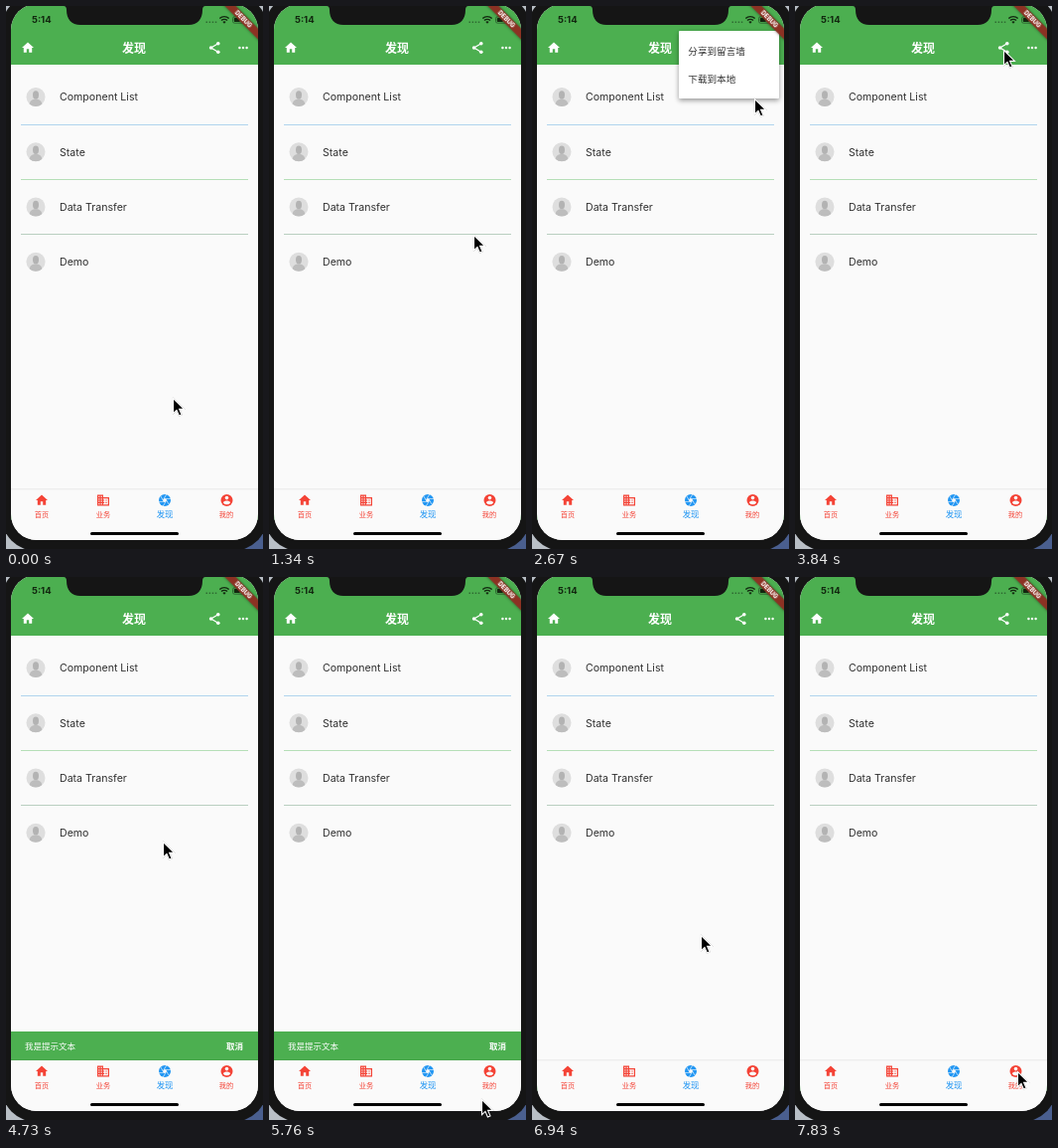
Recreate the animation shown at these times as an HTML page. Size 259 px wide and 546 px high, loop 8 s.

```html
<!DOCTYPE html>
<html lang="zh-CN">
<head>
<meta charset="utf-8">
<title>App demo</title>
<style>
  html, body { margin: 0; width: 100%; height: 100%; overflow: hidden; background: #b9bfc6; }
  svg { display: block; }
  #stage { width: 100vw; height: 100vh; }
  text { font-family: Inter, "Noto Sans CJK SC", "Noto Sans CJK", sans-serif; }
  .mid { text-anchor: middle; }
  .row { font-size: 10.6px; fill: #303030; }
  .nav { font-size: 7.2px; fill: #f44336; }
  .tip { font-size: 8.5px; fill: #fff; }
  .item { font-size: 9.6px; fill: #333; }

  #cursor, #menu, #sheet, .item, #snack, #press, #cancel { animation: 8s step-end infinite; }
  #cursor { animation-name: move; }
  #menu { animation-name: menu; filter: drop-shadow(0 2px 2.5px rgba(0,0,0,.4)); }
  #sheet { animation-name: unfold; }
  #item1 { animation-name: item1; }
  #item2 { animation-name: item2; }
  #snack { animation-name: snack; }
  #press { animation-name: press; }
  #cancel { animation-name: dim; }

  @keyframes move {
    0% { transform: translate(168px, 394px); }
    16.74% { transform: translate(206px, 230px); }
    18.62% { transform: translate(244px, 67px); }
    22.24% { transform: translate(243px, 58px); }
    24.12% { transform: translate(240px, 45px); }
    25.99% { transform: translate(238px, 39px); }
    31.49% { transform: translate(236px, 52px); }
    33.37% { transform: translate(224px, 93px); }
    35.12% { transform: translate(203px, 190px); }
    36.99% { transform: translate(182px, 285px); }
    38.87% { transform: translate(174px, 315px); }
    44.24% { transform: translate(188px, 220px); }
    46.12% { transform: translate(207px, 80px); }
    47.99% { transform: translate(210px, 44px); }
    55.37% { transform: translate(198px, 102px); }
    57.24% { transform: translate(172px, 215px); }
    59.12% { transform: translate(158px, 266px); }
    60.87% { transform: translate(159px, 302px); }
    62.74% { transform: translate(161px, 322px); }
    70.12% { transform: translate(182px, 420px); }
    71.99% { transform: translate(214px, 525px); }
    73.74% { transform: translate(222px, 485px); }
    75.62% { transform: translate(223px, 468px); }
    86.74% { transform: translate(170px, 360px); }
    88.62% { transform: translate(75px, 180px); }
    90.49% { transform: translate(25px, 76px); }
    92.37% { transform: translate(80px, 220px); }
    94.24% { transform: translate(180px, 420px); }
    95.99% { transform: translate(236px, 511px); }
    97.87%, 100% { transform: translate(224px, 497px); }
  }
  @keyframes menu {
    0% { opacity: 0; }
    29.62% { opacity: .85; }
    31.49% { opacity: 1; }
    42.49% { opacity: .5; }
    44.24%, 100% { opacity: 0; }
  }
  @keyframes unfold {
    0% { height: 34px; }
    31.49%, 100% { height: 68px; }
  }
  @keyframes item1 {
    0% { opacity: .3; }
    31.49%, 100% { opacity: 1; }
  }
  @keyframes item2 {
    0% { opacity: 0; }
    31.49% { opacity: .8; }
    33.37%, 100% { opacity: 1; }
  }
  @keyframes snack {
    0% { transform: translateY(30px); }
    53.49% { transform: translateY(20px); }
    55.37% { transform: translateY(1px); }
    57.24% { transform: none; }
    79.24% { transform: translateY(5px); }
    81.12% { transform: translateY(25px); }
    82.99%, 100% { transform: translateY(30px); }
  }
  @keyframes press {
    0% { opacity: 0; }
    79.24% { opacity: .1; }
    82.99%, 100% { opacity: 0; }
  }
  @keyframes dim {
    0% { opacity: 1; }
    79.24%, 100% { opacity: .55; }
  }
</style>
</head>
<body>
<svg id="stage" viewBox="0 0 259 546" preserveAspectRatio="none">
  <defs>
    <clipPath id="screen"><rect x="5" y="-2" width="249" height="539" rx="26"/></clipPath>
    <symbol id="home" viewBox="0 0 24 24"><path d="M10 20v-6h4v6h5v-8h3L12 3 2 12h3v8z"/></symbol>
    <symbol id="share" viewBox="0 0 24 24">
      <path d="M18 5 6 12l12 7" fill="none" stroke="#fff" stroke-width="2"/>
      <circle cx="18" cy="5" r="3"/><circle cx="6" cy="12" r="3"/><circle cx="18" cy="19" r="3"/>
    </symbol>
    <symbol id="more" viewBox="0 0 24 24">
      <circle cx="6" cy="12" r="2"/><circle cx="12" cy="12" r="2"/><circle cx="18" cy="12" r="2"/>
    </symbol>
    <symbol id="office" viewBox="0 0 24 24">
      <path fill-rule="evenodd" d="M2 3h10v4h10v14H2zM12 9v10h8V9z"/>
      <path d="M5 5v14M9 5v14" stroke="#fafafa" stroke-width="2" stroke-dasharray="2"/>
      <path d="M13 11v6M17 11v6" stroke="#f44336" stroke-width="2" stroke-dasharray="2"/>
    </symbol>
    <path id="blade" d="M10.6 9.5H22" stroke="#fafafa"/>
    <symbol id="shutter" viewBox="0 0 24 24">
      <circle cx="12" cy="12" r="10"/>
      <path d="M10.5 9.4h3l1.5 2.6-1.5 2.6h-3L9 12z" fill="#fafafa"/>
      <use href="#blade"/>
      <use href="#blade" transform="rotate(60 12 12)"/>
      <use href="#blade" transform="rotate(120 12 12)"/>
      <use href="#blade" transform="rotate(180 12 12)"/>
      <use href="#blade" transform="rotate(240 12 12)"/>
      <use href="#blade" transform="rotate(300 12 12)"/>
    </symbol>
    <symbol id="account" viewBox="0 0 24 24">
      <circle cx="12" cy="12" r="10"/>
      <g fill="#fafafa">
        <circle cx="12" cy="8" r="3"/>
        <path d="M6 15.98c.03-1.99 4-3.08 6-3.08s5.97 1.09 6 3.08a7.2 7.2 0 0 1-12 0z"/>
      </g>
    </symbol>
    <symbol id="avatar" viewBox="0 0 20 20">
      <circle cx="10" cy="10" r="9.5" fill="#dedede"/>
      <path d="M3.8 17.2c.3-3.4 2.3-4.4 4.6-5h3.2c2.3.6 4.3 1.6 4.6 5a9.5 9.5 0 0 1-12.4 0z" fill="#bdbdbd"/>
      <ellipse cx="10" cy="8" rx="3" ry="4.2" fill="#b3b3b3"/>
    </symbol>
  </defs>

  <rect width="259" height="546" fill="#b9bfc6"/>
  <rect x="200" y="500" width="59" height="46" fill="#4a5f8f"/>
  <rect x="-5" y="-12" width="269" height="560" rx="36" fill="#151515"/>

  <g clip-path="url(#screen)">
    <rect x="5" y="-2" width="249" height="539" fill="#fafafa"/>
    <rect x="5" y="-2" width="249" height="61" fill="#4caf50"/>

    <g fill="#12280f">
      <text x="26" y="17.4" font-size="9.5" font-weight="700">5:14</text>
      <path d="M201.5 16.2h11" stroke="#2f6b32" stroke-width="1.4" stroke-dasharray="1.5 1.6"/>
      <path d="M215.3 12.6a6.6 6.6 0 0 1 9.4 0M217 14.6a4.2 4.2 0 0 1 6 0" fill="none" stroke="#12280f" stroke-width="1.4"/>
      <path d="m220 17.8-1.6-1.8a2.3 2.3 0 0 1 3.2 0z"/>
      <rect x="228.5" y="10.8" width="12" height="6.4" rx="1.8" fill="none" stroke="#2a5a2c" stroke-width=".8"/>
      <rect x="229.8" y="12" width="6" height="4" rx=".8"/>
    </g>
    <path d="M58 0q3 0 3 4c0 9 5 15 14 15h109c9 0 14-6 14-15q0-4 3-4z" fill="#151515"/>

    <g fill="#fff">
      <use href="#home" x="14.8" y="34.8" width="14.4" height="14.4"/>
      <text class="mid" x="129" y="46.5" font-size="12" font-weight="600">发现</text>
      <use href="#share" x="203" y="34.8" width="14.4" height="14.4"/>
      <use href="#more" x="231.8" y="34.8" width="14.4" height="14.4"/>
    </g>

    <use href="#avatar" x="20" y="81.5" width="20" height="20"/>
    <use href="#avatar" x="20" y="136.8" width="20" height="20"/>
    <use href="#avatar" x="20" y="192" width="20" height="20"/>
    <use href="#avatar" x="20" y="247.3" width="20" height="20"/>
    <g class="row">
      <text class="row" x="54" y="95.4">Component List</text>
      <text class="row" x="54" y="150.7">State</text>
      <text class="row" x="54" y="206">Data Transfer</text>
      <text class="row" x="54" y="261.2">Demo</text>
    </g>
    <path d="M15 119.5h229" stroke="#b0d4ee"/>
    <path d="M15 174.5h229" stroke="#b5dfb7"/>
    <path d="M15 229.5h229" stroke="#b9cfc0"/>

    <g id="snack">
      <rect x="5" y="457" width="249" height="30" fill="#4caf50"/>
      <rect id="press" x="208" y="459" width="40" height="26" fill="#fff"/>
      <text class="tip" x="19" y="474.6">我是提示文本</text>
      <text class="tip" id="cancel" x="222" y="474.6" font-weight="600">取消</text>
    </g>

    <rect x="5" y="486" width="249" height="51" fill="#fafafa"/>
    <path d="M5 485.8h249" stroke="#000" stroke-opacity=".07"/>
    <g fill="#f44336">
      <use href="#home" x="28.8" y="489.8" width="14.4" height="14.4"/>
      <use href="#office" x="90.8" y="489.8" width="14.4" height="14.4"/>
      <use href="#shutter" x="152.8" y="489.8" width="14.4" height="14.4" fill="#2196f3"/>
      <use href="#account" x="215.3" y="489.8" width="14.4" height="14.4"/>
    </g>
    <text class="nav mid" x="36" y="513.8">首页</text>
    <text class="nav mid" x="98" y="513.8">业务</text>
    <text class="mid" x="160" y="514.1" font-size="8.4" fill="#2196f3">发现</text>
    <text class="nav mid" x="222" y="513.8">我的</text>
    <rect x="85" y="529" width="89" height="3" rx="1.5" fill="#000"/>

    <g id="menu">
      <rect id="sheet" x="148" y="25" width="101" height="68" rx="1" fill="#fff"/>
      <text class="item" id="item1" x="157.3" y="48.6">分享到留言墙</text>
      <text class="item" id="item2" x="157.3" y="77.4">下载到本地</text>
    </g>

    <g transform="translate(239.3 13.3) rotate(45)">
      <rect x="-30" y="-3.8" width="60" height="7.6" fill="#8c3123" style="filter:drop-shadow(0 0 1.5px rgba(0,0,0,.5))"/>
      <text class="mid" y="2.2" font-size="6.2" font-weight="800" fill="#fff">DEBUG</text>
    </g>
  </g>

  <g id="cursor">
    <path d="M.5.5v15.2l3.5-3.3 2.4 5.6 2.6-1.1-2.4-5.5h4.9z" stroke="#fff" stroke-width="1.1"
      style="filter:drop-shadow(0 .7px .7px rgba(0,0,0,.4))"/>
  </g>
</svg>
</body>
</html>
```
